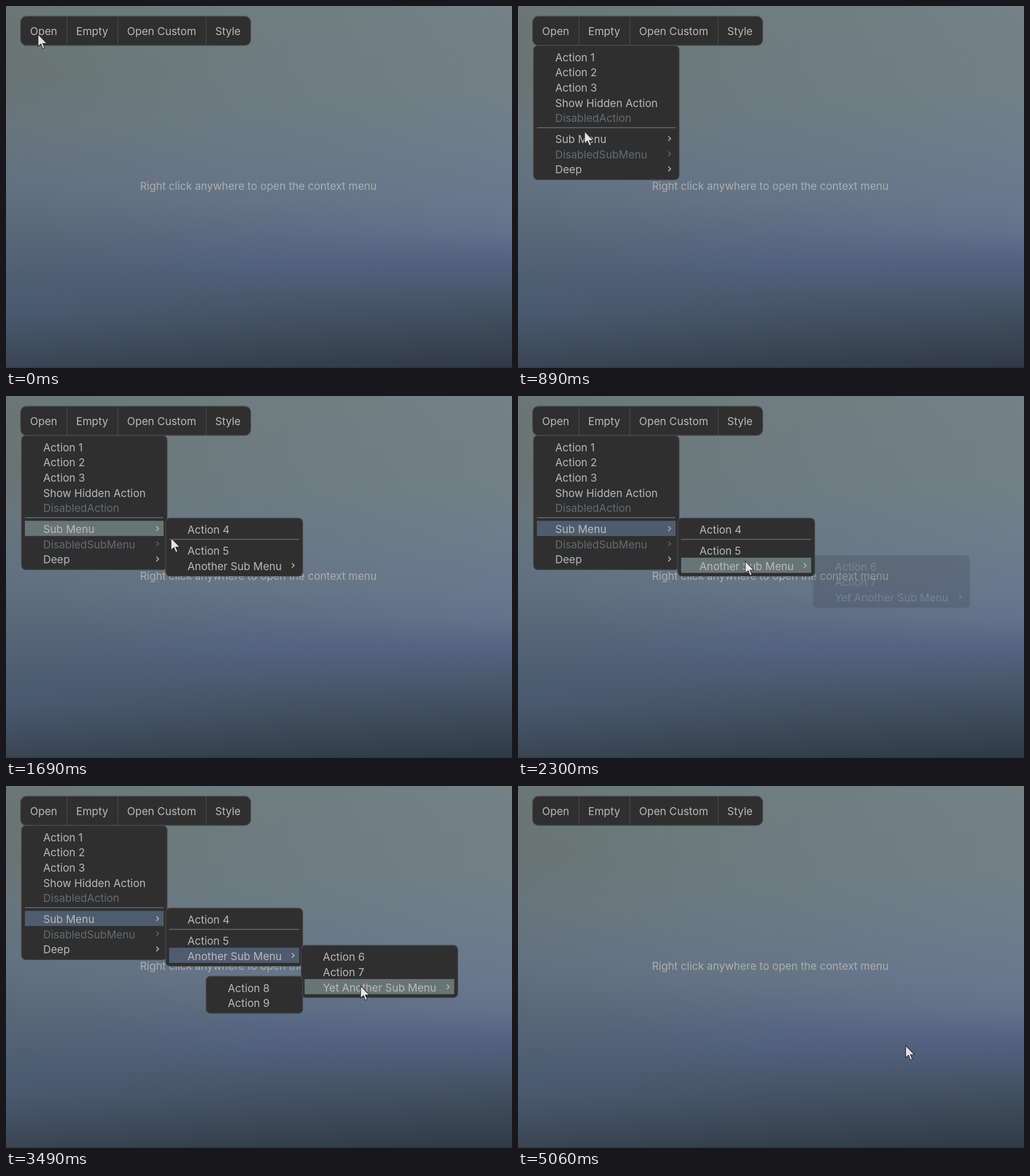
An HTML page that plays this animation: 884x634 px, repeating every 5.1 s.

```html
<!DOCTYPE html>
<html lang="en">
<head>
<meta charset="utf-8">
<title>Context menu</title>
<style>
  html, body { margin: 0; width: 100%; height: 100%; overflow: hidden; background: #5d6b7c; }
  svg { display: block; width: 884px; height: 634px; }
  text { font: 18.66px Inter, sans-serif; font-optical-sizing: none; fill: #b9b9b9; white-space: pre; }
</style>
</head>
<body>
<svg id="stage" viewBox="0 0 884 634" xmlns="http://www.w3.org/2000/svg"></svg>
<script>
const LOOP = 5100, ROW = 26.6, GAP = 10.3, PAD = 5.9;
const PANEL = '#2f2f2f', PANEL_FADING = '#30343a', EDGE = '#484b4b';
const HOVER = '#687575', OPENED = '#4f5c70';
const stage = document.getElementById('stage');

function add(parent, tag, attrs, text) {
  const node = document.createElementNS('http://www.w3.org/2000/svg', tag);
  for (const key in attrs) node.setAttribute(key, attrs[key]);
  if (text) node.textContent = text;
  parent.appendChild(node);
  return node;
}

// Backdrop: three vertical ramps blended sideways.
function buildBackdrop() {
  const defs = add(stage, 'defs', {});
  const ramp = (id, stops, extra) => {
    const gradient = add(defs, 'linearGradient', { id, x1: 0, y1: 0, x2: 0, y2: 1, ...extra });
    for (const [offset, color, opacity = 1] of stops)
      add(gradient, 'stop', { offset, 'stop-color': color, 'stop-opacity': opacity });
  };
  const across = { x2: 1, y2: 0 };
  ramp('left', [[0, '#6a7775'], [.2, '#697573'], [.32, '#69767d'], [.48, '#647280'], [.62, '#5b6878'],
    [.75, '#4f5f73'], [.85, '#4a5a70'], [.94, '#414e5f'], [1, '#3b4553']]);
  ramp('middle', [[0, '#6f7d7f'], [.24, '#6e7c82'], [.4, '#6a7985'], [.54, '#667488'], [.63, '#5c6a83'],
    [.7, '#546380'], [.79, '#4c5a71'], [.88, '#435060'], [1, '#343f4a']]);
  ramp('right', [[0, '#748287'], [.24, '#728087'], [.4, '#6d7d8b'], [.54, '#69788f'], [.62, '#64728b'],
    [.7, '#556280'], [.78, '#4b5970'], [.86, '#414e5d'], [1, '#303a46']]);
  ramp('toMiddle', [[0, '#fff', 0], [.5, '#fff', 1]], across);
  ramp('toRight', [[.5, '#fff', 0], [1, '#fff', 1]], across);
  const fill = { width: 884, height: 634 };
  add(stage, 'rect', { ...fill, fill: 'url(#left)' });
  for (const [name, blend] of [['middle', 'toMiddle'], ['right', 'toRight']]) {
    const mask = add(defs, 'mask', { id: name + 'Mask' });
    add(mask, 'rect', { ...fill, fill: `url(#${blend})` });
    add(stage, 'rect', { ...fill, fill: `url(#${name})`, mask: `url(#${name}Mask)` });
  }
  add(stage, 'rect', { y: 632, width: 884, height: 2, fill: '#1c242e', opacity: .2 });
}

function buildBar() {
  add(stage, 'rect', { x: 25.5, y: 18, width: 402, height: 51, rx: 10.5, fill: PANEL, stroke: EDGE, 'stroke-width': 1.3 });
  const press = add(stage, 'path', { d: 'M106 19V68.5H36a10 10 0 0 1-10-10V29a10 10 0 0 1 10-10z', fill: '#454848' });
  for (const x of [106.5, 195.5, 349.5])
    add(stage, 'path', { d: `M${x} 19V68.5`, stroke: EDGE, 'stroke-width': 1.2 });
  for (const [x, label] of [[42, 'Open'], [122.5, 'Empty'], [211.5, 'Open Custom'], [365.5, 'Style']])
    add(stage, 'text', { x, y: 51 }, label);
  return press;
}

// Labels: '-' is a separator, a leading '!' disables, a trailing '>' opens a submenu.
function buildMenu(left, top, right, openAt, labels) {
  const group = add(stage, 'g', {});
  const marks = {};
  const panel = add(group, 'rect', { x: left, y: top, width: right - left, rx: 7.5, stroke: EDGE, 'stroke-width': 1.3 });
  let y = top + PAD;
  for (const item of labels) {
    if (item === '-') {
      add(group, 'path', { d: `M${left + 6} ${y + 4.8}H${right - 6.2}`, stroke: '#737a7e', 'stroke-width': 1.3 });
      y += GAP;
      continue;
    }
    const label = item.replace(/[!>]/g, '');
    const color = item[0] === '!' ? '#646b71' : '#b9b9b9';
    marks[label] = add(group, 'rect', { x: left + 6, y, width: right - left - 12.2, height: ROW });
    add(group, 'text', { x: left + 38, y: y + 21.5, style: `fill:${color}` }, label);
    if (item.endsWith('>'))
      add(group, 'path', { d: `M${right - 19} ${y + 9.6}l4 4-4 4`, fill: 'none', stroke: color, 'stroke-width': 1.6 });
    y += ROW;
  }
  panel.setAttribute('height', y + PAD - top);
  return { group, panel, marks, openAt };
}

buildBackdrop();
const press = buildBar();
add(stage, 'text', { x: 440.8, y: 322.3, 'text-anchor': 'middle', style: 'fill:#aeaeae' },
  'Right click anywhere to open the context menu');

const menus = [
  buildMenu(27, 69.4, 281.6, 200, ['Action 1', 'Action 2', 'Action 3', 'Show Hidden Action', '!DisabledAction', '-',
    'Sub Menu>', '!DisabledSubMenu>', 'Deep>']),
  buildMenu(279, 213.8, 518.4, 1140, ['Action 4', '-', 'Action 5', 'Another Sub Menu>']),
  buildMenu(515.6, 279, 789.3, 2250, ['Action 6', 'Action 7', 'Yet Another Sub Menu>']),
  buildMenu(349.5, 333.2, 518.4, 3290, ['Action 8', 'Action 9'])
];

// menu index, label, start, end, colour
const highlights = [
  [0, 'Action 2', 640, 740, HOVER],
  [0, 'Action 3', 740, 790, HOVER],
  [0, 'Show Hidden Action', 790, 840, HOVER],
  [0, 'Sub Menu', 940, 1840, HOVER],
  [0, 'Sub Menu', 1840, LOOP, OPENED],
  [1, 'Action 5', 1840, 2090, HOVER],
  [1, 'Another Sub Menu', 2090, 2890, HOVER],
  [1, 'Another Sub Menu', 2890, LOOP, OPENED],
  [2, 'Action 7', 2890, 2990, HOVER],
  [2, 'Yet Another Sub Menu', 2990, 4540, HOVER],
  [2, 'Yet Another Sub Menu', 4540, LOOP, OPENED]
];

const cursor = add(stage, 'path', {
  d: 'M0 0V21.5L5 17 8.3 25.2 11.6 23.8 8.2 16H15.4Z',
  fill: '#e2e2e2', stroke: '#2b2b2b', 'stroke-width': 1.1, 'stroke-linejoin': 'round'
});

// time, x, y of the pointer tip
const path = [
  [140, 56, 49.5], [390, 60.5, 48.5], [440, 60.5, 48.5], [640, 77, 112], [690, 84, 128],
  [890, 116.3, 219.5], [1040, 126, 233], [1440, 126, 233], [1690, 288.3, 248.5],
  [1940, 370, 277], [2040, 370, 277], [2150, 397, 289], [2440, 397, 289], [2840, 537.3, 317.5],
  [3040, 594, 343], [3490, 619.5, 350], [4390, 619.5, 350], [4690, 655, 410],
  [4890, 677, 453], [5040, 677.3, 454.5]
];

const clamp = v => Math.max(0, Math.min(1, v));

function pointerAt(t) {
  const next = path.findIndex(p => p[0] > t);
  if (next === 0) return path[0].slice(1);
  if (next < 0) return path[path.length - 1].slice(1);
  const a = path[next - 1], b = path[next], k = (t - a[0]) / (b[0] - a[0]);
  return [a[1] + (b[1] - a[1]) * k, a[2] + (b[2] - a[2]) * k];
}

function render(time) {
  const t = time % LOOP;
  const tick = t - (t + 10) % 50;
  const closing = t < 4955 ? 1 : t < 5055 ? .4 : 0;

  press.setAttribute('opacity', t >= 160 && t < 260 ? 1 : 0);
  for (const { group, panel, marks, openAt } of menus) {
    const shown = clamp((tick - openAt) / 200);
    group.setAttribute('opacity', shown * closing);
    panel.setAttribute('fill', shown < 1 ? PANEL_FADING : PANEL);
    for (const label in marks) marks[label].setAttribute('fill', 'none');
  }
  for (const [menu, label, start, end, color] of highlights)
    if (tick >= start && tick < end) menus[menu].marks[label].setAttribute('fill', color);

  const [x, y] = pointerAt(tick);
  cursor.setAttribute('transform', `translate(${x} ${y})`);
}

const start = performance.now();
function loop() {
  render(performance.now() - start);
  requestAnimationFrame(loop);
}
render(0);
requestAnimationFrame(loop);
</script>
</body>
</html>
```
